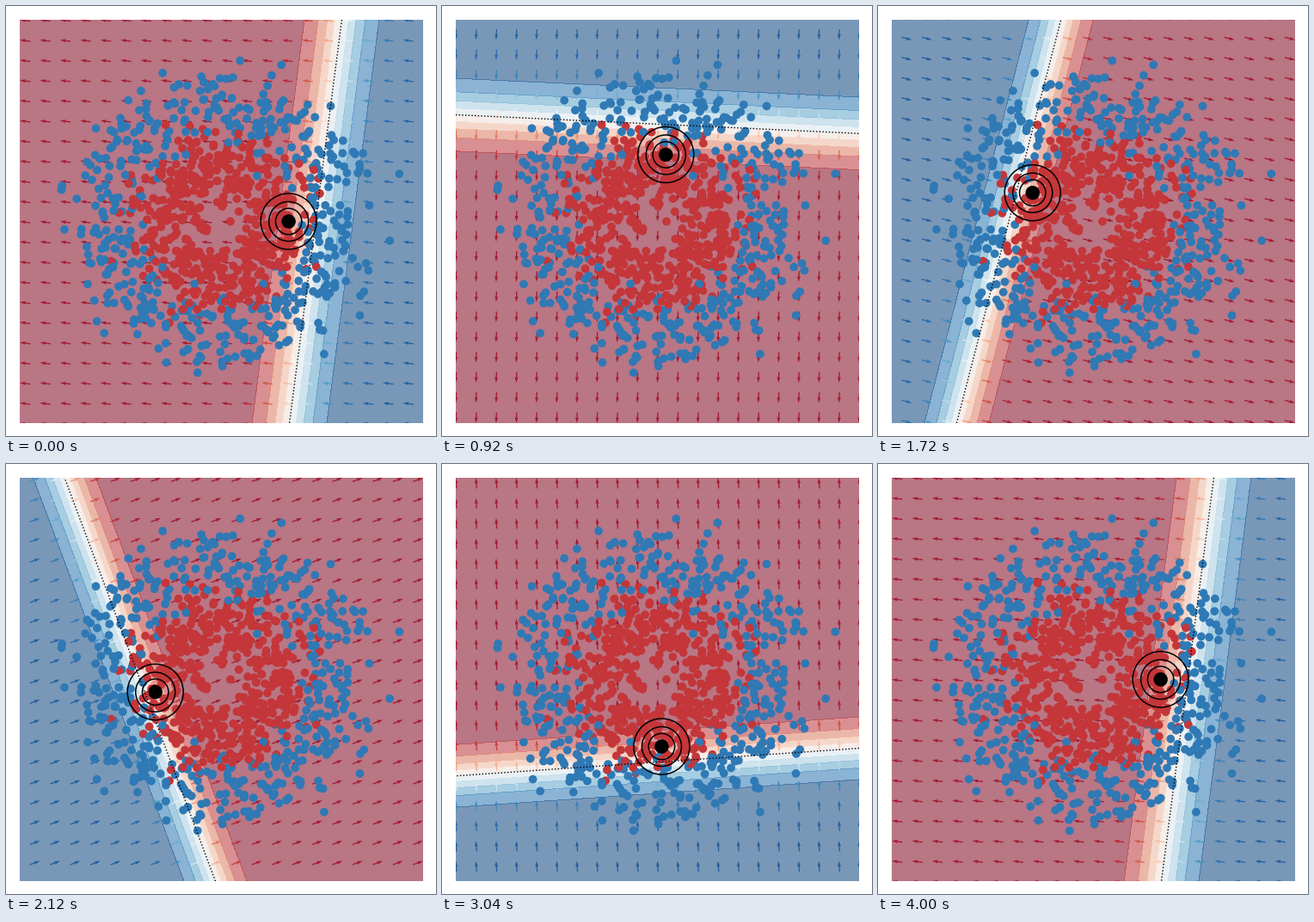
A matplotlib script for the animation above (4040 ms loop, 500x500 px).

```python
import numpy as np
import matplotlib.pyplot as plt
from matplotlib.animation import FuncAnimation
from matplotlib.patches import Circle

FRAMES = 101
LIM = 3
UNIT = 469 / (2 * LIM)  # pixels per data unit
RED, BLUE = "#c43639", "#2f79b5"


def make_circles(n, factor, noise, seed=0):
    """Two noisy concentric rings, shuffled and standardised."""
    rng = np.random.RandomState(seed)
    a = np.linspace(0, 2 * np.pi, n // 2, endpoint=False)
    ring = np.c_[np.cos(a), np.sin(a)]
    xy = np.vstack([ring, factor * ring])
    inner = np.arange(n) >= n // 2
    order = np.arange(n)
    rng.shuffle(order)
    xy = xy[order] + rng.normal(scale=noise, size=xy.shape)
    return (xy - xy.mean(0)) / xy.std(0), inner[order]


# Tilt (deg) and offset (px) of the local linear model at a few angles
KEY_ANGLES = np.radians([0, 46.8, 118.8, 190.8, 237.6, 306])
TILTS = [-7.4, -2.0, 9.7, 9.7, 7.3, -6.0]
OFFSETS = [108.6, 113.9, 107.3, 88.7, 94.9, 97.6]


def harmonics(a):
    a = np.atleast_1d(a)[:, None]
    k = np.arange(1, 7)
    return np.hstack([np.ones_like(a), np.cos(k * a) / k**2, np.sin(k * a) / k**2])


# The minimum-norm solution is a smooth periodic curve through the keys
COEF = np.linalg.pinv(harmonics(KEY_ANGLES)) @ np.c_[TILTS, OFFSETS]


def local_model(a):
    tilt, offset = (harmonics(a) @ COEF)[0]
    soft = 17.7 + 1.9 * np.cos(a) + 1.3 * np.sin(a)
    normal = a + np.radians(tilt)
    return np.cos(normal), np.sin(normal), offset / UNIT, soft / UNIT


def mesh(n):
    g = np.linspace(-LIM, LIM, n)
    return np.meshgrid(g, g)


def prob(x, y, model):
    nx, ny, offset, soft = model
    return 1 / (1 + np.exp(-(x * nx + y * ny - offset) / soft))


X, Y = mesh(161)
QX, QY = mesh(21)
LEVELS = np.linspace(0, 1, 11)

fig = plt.figure(figsize=(5, 5), dpi=100, facecolor="white")
ax = fig.add_axes([0.032, 0.03, 0.938, 0.938], facecolor="#f2f5f7")
ax.set(xlim=(-LIM, LIM), ylim=(-LIM, LIM), xticks=[], yticks=[])
ax.set_autoscale_on(False)
ax.spines[:].set_visible(False)

arrows = ax.quiver(QX, QY, -np.ones_like(QX), np.zeros_like(QX), QX,
                   pivot="tip", cmap="RdBu", alpha=0.9, zorder=1)
arrows.set_clim(-0.09, 1.09)

points, inner = make_circles(1000, factor=0.5, noise=0.17)
ax.scatter(*points.T, c=np.where(inner, RED, BLUE), zorder=2)

rings = [ax.add_patch(Circle((0, 0), r / UNIT, fill=False, ec="black", lw=1.1, zorder=4))
         for r in (32.5, 23, 15.2)]
dot = ax.add_patch(Circle((0, 0), 8.2 / UNIT, fc="black", lw=0, zorder=5))
contours = []


def update(i):
    a = 2 * np.pi * i / (FRAMES - 1)
    model = local_model(a)
    while contours:
        contours.pop().remove()
    z = prob(X, Y, model)
    contours.append(ax.contourf(X, Y, z, LEVELS, cmap="RdBu", alpha=0.54, zorder=0))
    contours.append(ax.contour(X, Y, z, [0.5], colors="black",
                               linestyles="dotted", linewidths=1, zorder=3))
    nx, ny = model[:2]
    arrows.set_UVC(np.full_like(QX, -nx), np.full_like(QX, -ny), prob(QX, QY, model))
    for c in (*rings, dot):
        c.center = np.cos(a), np.sin(a)
    return []


anim = FuncAnimation(fig, update, frames=FRAMES, interval=40,
                     repeat=True, repeat_delay=0, blit=False)
plt.show()
```
